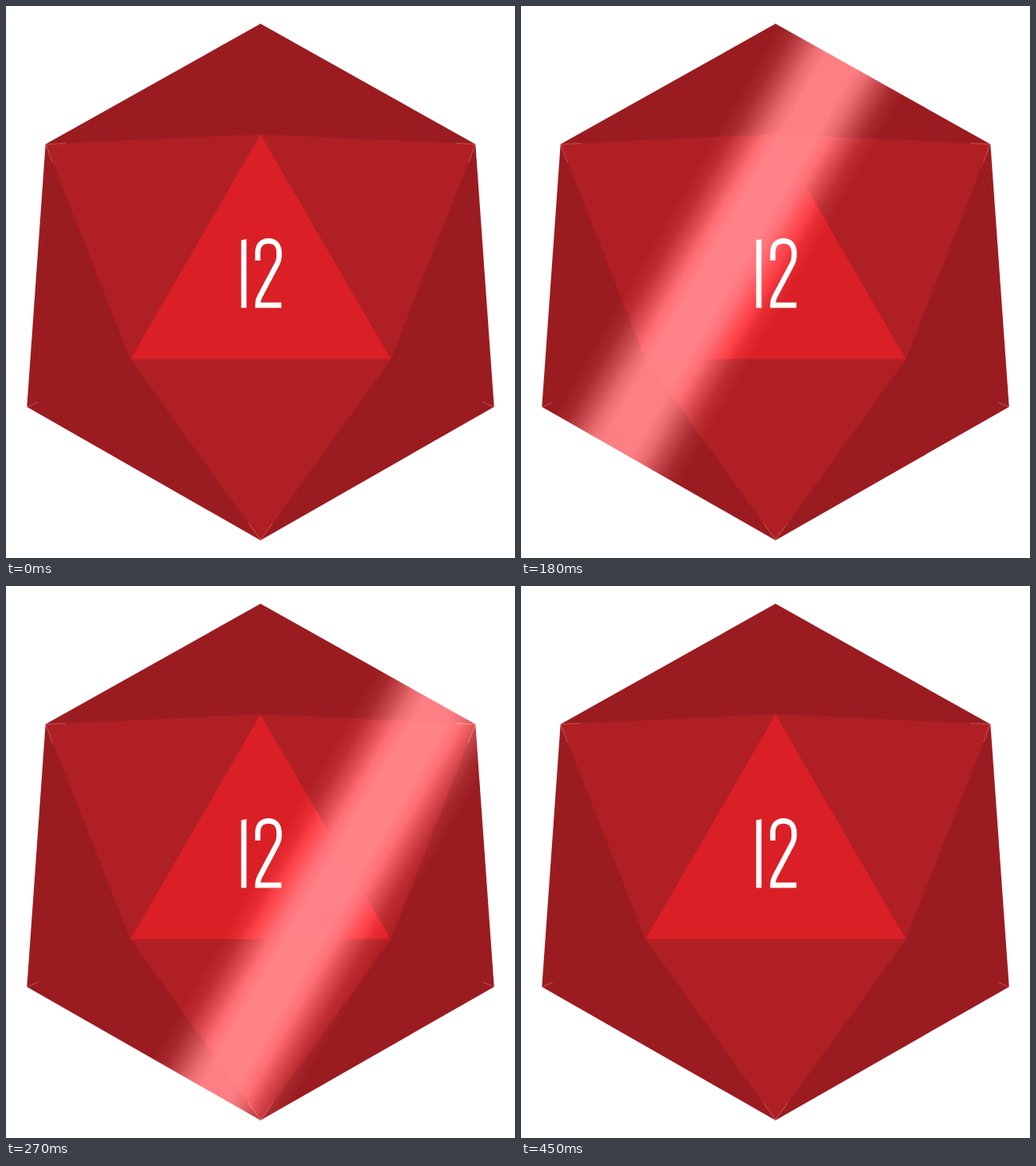
Recreate the animation shown at these times as an HTML page. Size 640 px wide and 694 px high, loop 4500 ms.

```html
<!DOCTYPE html>
<html lang="en">
<head>
<meta charset="utf-8">
<title>Twenty-sided die</title>
<style>
  html, body { margin: 0; width: 100%; height: 100%; overflow: hidden; background: #fff; }
  svg { display: block; width: 100vw; height: 100vh; }
  .scene { isolation: isolate; }
  #glint { mix-blend-mode: plus-lighter; }
</style>
</head>
<body>
<svg viewBox="0 0 640 694" role="img" aria-label="Die showing 12">
  <defs>
    <linearGradient id="shine" gradientUnits="userSpaceOnUse" x1="-91" x2="91" y1="0" y2="0">
      <stop offset="0" stop-color="#000"/>
      <stop offset=".1" stop-color="#0d0d0d"/>
      <stop offset=".2" stop-color="#2c2c2c"/>
      <stop offset=".3" stop-color="#505050"/>
      <stop offset=".39" stop-color="#636363"/>
      <stop offset=".61" stop-color="#636363"/>
      <stop offset=".7" stop-color="#505050"/>
      <stop offset=".8" stop-color="#2c2c2c"/>
      <stop offset=".9" stop-color="#0d0d0d"/>
      <stop offset="1" stop-color="#000"/>
    </linearGradient>
  </defs>
  <g class="scene">
    <rect width="640" height="694" fill="#fff"/>
    <path fill="#9b1c20" d="M320 22.3L590.3 173.8L613.7 504L320 671.7L26.3 504L49.7 173.8Z"/>
    <path fill="#af1f24" d="M49.7 173.8L320 161.3L590.3 173.8L484 444L320 671.7L156.5 444Z"/>
    <path fill="#da1f26" d="M320 161.3L484 444H156.5Z"/>
    <!-- pale seams at the outer corners -->
    <path fill="none" stroke="#e5a5a7" stroke-width=".7" stroke-opacity=".6"
      d="M50 173.8L75 172.6M50 174L58.6 197M590 173.8L565 172.6M590 174L581.4 197
         M26.5 504L40 498.2M613.5 504L600 498.2M320 671L304.5 649.5M320 671L335.5 649.5"/>
    <path id="glint" fill="url(#shine)" d="M320 22.3L590.3 173.8L613.7 504L320 671.7L26.3 504L49.7 173.8Z"/>
    <path fill="#fff" d="M295.7 294.6L302.4 292.9V379.5H295.7Z"/>
    <path fill="none" stroke="#fff" stroke-width="6.6"
      d="M316.6 320V310C316.6 300.5 322 295.4 330 295.4S343.4 300.5 343.4 310V315Q343.4 319.5 341 324L319 365.5Q316.6 370 316.6 376.1H346.3"/>
  </g>
</svg>
<script>
  const LOOP = 4500, STEP = 30, SWEEP_START = 30, SWEEP_END = 450;
  const glint = document.getElementById('glint');
  const shine = document.getElementById('shine');

  function render(time) {
    const t = Math.floor((time % LOOP) / STEP) * STEP;
    const sweeping = t >= SWEEP_START && t < SWEEP_END;
    glint.style.display = sweeping ? '' : 'none';
    // The band leans 30 degrees and slides right at a constant speed.
    const x = 64 + 2.1 * t;
    shine.setAttribute('gradientTransform', `translate(${x} 0) rotate(30)`);
  }

  const start = performance.now();
  function tick() {
    render(performance.now() - start);
    requestAnimationFrame(tick);
  }
  tick();
</script>
</body>
</html>
```
